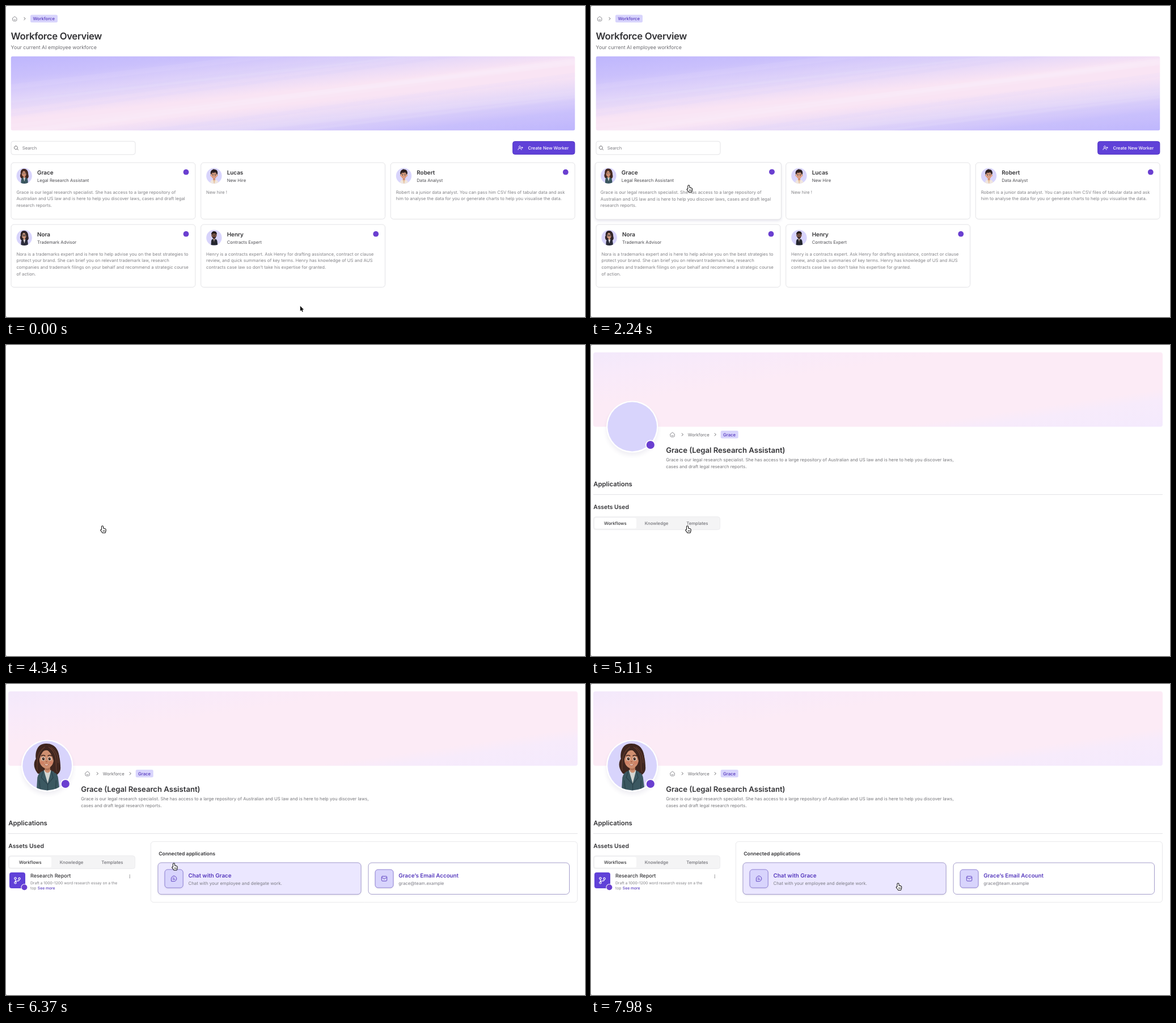
Recreate the animation shown at these times as an HTML page with a canvas. Size 1021 px wide and 548 px high, loop 8 s.

```html
<!DOCTYPE html>
<html lang="en">
<head>
<meta charset="utf-8">
<title>Workforce</title>
<style>
  html, body { margin: 0; width: 100%; height: 100%; overflow: hidden; background: #fff; }
  canvas { display: block; width: 100vw; height: 100vh; }
</style>
</head>
<body>
<canvas id="stage"></canvas>
<script>
const W = 1021, H = 548, LOOP = 8000, STEP = 70;
const canvas = document.getElementById('stage');
const ctx = canvas.getContext('2d');
const ratio = window.devicePixelRatio || 1;
canvas.width = W * ratio;
canvas.height = H * ratio;

const INK = '#333336', DARK = '#4d4d52', GREY = '#838387', LINE = '#e3e3e6';
const PURPLE = '#6041d8', DEEP = '#5538bd', LILAC = '#d8d4fc', BADGE = '#6a3fd0';

const ICONS = {
  home: 'M4 10 L12 3.5 L20 10 V17 a4 4 0 0 1 -4 4 H8 a4 4 0 0 1 -4 -4 Z M8.5 15.5 q3.5 3 7 0',
  next: 'M9 5 L16 12 L9 19',
  search: 'M11 3 a8 8 0 1 0 .01 0 M17 17 L22 22',
  addUser: 'M9 4 a4 4 0 1 0 .01 0 M2 20 v-1 a5 5 0 0 1 5 -5 h4 a5 5 0 0 1 5 5 v1 M19 8 v6 M16 11 h6',
  chat: 'M12 3 a9 9 0 1 1 0 18 H4 a1 1 0 0 1 -1 -1 V12 a9 9 0 0 1 9 -9 M8 10 h5 M8 14.5 h8',
  mail: 'M6 4 h12 a3 3 0 0 1 3 3 v10 a3 3 0 0 1 -3 3 H6 a3 3 0 0 1 -3 -3 V7 a3 3 0 0 1 3 -3 M4 8 L12 13 L20 8',
  branch: 'M6 3 a3 3 0 1 0 .01 0 M6 9 v7 M6 16 a3 3 0 1 0 .01 0 M18 4 a3 3 0 1 0 .01 0 M18 10 q0 4 -5 4 h-3 q-4 0 -4 3'
};
for (const k in ICONS) ICONS[k] = new Path2D(ICONS[k]);
const HAND = new Path2D('M-1.1 .8 A1.1 1.1 0 0 1 1.1 .8 L1.1 4 Q2 3.4 2.8 4.2 Q3.8 3.8 4.4 4.7 Q5.6 4.6 5.8 5.7 L5.7 8 Q5.5 9.4 4.7 11 L.3 11 Q-1.2 8.8 -2.7 7 Q-3 5.8 -1.9 5.8 L-1.1 6.5 Z');
const KNUCKLES = new Path2D('M1.2 6.8 V9.2 M2.7 6.8 V9.2 M4.2 6.8 V9.2');
const ARROW = new Path2D('M0 0 V9 L2.1 7.2 L3.5 10.3 L5 9.6 L3.6 6.6 L6.3 6.4 Z');

const clamp = v => Math.max(0, Math.min(1, v));
const smooth = v => v * v * (3 - 2 * v);

// y is the middle of the capitals
function text(str, x, y, size, color, weight = 400, spacing = 0) {
  ctx.font = `${weight} ${size}px Inter, sans-serif`;
  ctx.letterSpacing = spacing + 'px';
  ctx.fillStyle = color;
  ctx.fillText(str, x, y + size * 0.36);
}
function lines(list, x, y, size, color) {
  list.forEach((s, i) => text(s, x, y + i * 11.6, size, color));
}
function box(x, y, w, h, r, fill, stroke, lw = 1) {
  ctx.beginPath();
  ctx.roundRect(x, y, w, h, r);
  if (fill) { ctx.fillStyle = fill; ctx.fill(); }
  if (stroke) { ctx.strokeStyle = stroke; ctx.lineWidth = lw; ctx.stroke(); }
}
function oval(x, y, rx, ry, fill) {
  ctx.beginPath();
  ctx.ellipse(x, y, rx, ry, 0, 0, 7);
  ctx.fillStyle = fill;
  ctx.fill();
}
const disc = (x, y, r, fill) => oval(x, y, r, r, fill);
function shape(d, fill) {
  ctx.fillStyle = fill;
  ctx.fill(new Path2D(d));
}
function stroke(d, color, lw) {
  ctx.strokeStyle = color;
  ctx.lineWidth = lw;
  ctx.stroke(new Path2D(d));
}
function icon(name, x, y, size, color, lw = 0.8) {
  const k = size / 24;
  ctx.save();
  ctx.translate(x - size / 2, y - size / 2);
  ctx.scale(k, k);
  ctx.strokeStyle = color;
  ctx.lineWidth = lw / k;
  ctx.lineCap = ctx.lineJoin = 'round';
  ctx.stroke(ICONS[name]);
  ctx.restore();
}
function shadow(alpha, blur, dy) {
  ctx.shadowColor = `rgba(60,50,110,${alpha})`;
  ctx.shadowBlur = blur * ratio;
  ctx.shadowOffsetY = dy * ratio;
}
// runs draw scaled about the middle of a rectangle
function grow(x, y, w, h, amount, draw) {
  const cx = x + w / 2, cy = y + h / 2;
  ctx.save();
  ctx.translate(cx, cy);
  ctx.scale(1 + amount, 1 + amount);
  ctx.translate(-cx, -cy);
  draw();
  ctx.restore();
}

function banner(x, y, w, h, slope, span, stops, streaks) {
  const len = span / (1 + slope * slope);
  const g = ctx.createLinearGradient(x, y, x + slope * len, y + len);
  stops.forEach(([p, c]) => g.addColorStop(p, c));
  ctx.save();
  ctx.beginPath();
  ctx.roundRect(x, y, w, h, 4);
  ctx.clip();
  ctx.fillStyle = g;
  ctx.fillRect(x, y, w, h);
  let seed = 7;
  const rnd = () => (seed = seed * 16807 % 2147483647) / 2147483647;
  for (let i = 0; i < streaks; i++) {
    const top = y + rnd() * span, thick = 3 + rnd() * 9, tilt = w * (slope + 0.03 * rnd());
    ctx.fillStyle = i % 2 ? 'rgba(255,240,252,.06)' : 'rgba(190,178,252,.06)';
    ctx.beginPath();
    ctx.moveTo(x, top);
    ctx.lineTo(x + w, top - tilt);
    ctx.lineTo(x + w, top - tilt + thick);
    ctx.lineTo(x, top + thick);
    ctx.fill();
  }
  ctx.restore();
}

function face({ hair, skin, glasses, beard }) {
  oval(0, -13, 14.5, 18.5, skin);
  if (beard) shape('M-14 -9 Q-13 8 0 8 Q13 8 14 -9 Q9 -3 0 -4 Q-9 -3 -14 -9 Z', hair);
  oval(-9, -6, 4, 3, 'rgba(205,90,70,.25)');
  oval(9, -6, 4, 3, 'rgba(205,90,70,.25)');
  for (const s of [-1, 1]) {
    oval(s * 6.5, -14, 3.8, 3.8, '#f6efea');
    oval(s * 6.3, -14, 2.7, 3.1, '#40261b');
    disc(s * 6.3 + 0.8, -15.2, 0.7, '#fff');
  }
  stroke('M-10.5 -20 Q-6.5 -22.5 -3 -20 M3 -20 Q6.5 -22.5 10.5 -20', hair, 1.7);
  if (glasses) stroke('M-11.5 -18.5 h9 v9 h-9 Z M2.5 -18.5 h9 v9 h-9 Z M-2.5 -14 h5', hair, 1.6);
  oval(0, -8, 2, 1.5, 'rgba(150,70,50,.5)');
  shape('M-5 -3 Q0 -1.6 5 -3 Q0 2.5 -5 -3 Z', '#fff0ea');
  stroke('M-5 -3 Q0 3 5 -3', '#a04b3b', 1);
}

function avatar(x, y, r, look) {
  const { hair, skin, coat, shirt, long, glasses, zoom = 1, drop = 0 } = look;
  ctx.save();
  disc(x, y, r, LILAC);
  ctx.beginPath();
  ctx.arc(x, y, r, 0, 7);
  ctx.clip();
  ctx.translate(x, y + drop * r / 50);
  ctx.scale(r / 50 * zoom, r / 50 * zoom);
  ctx.lineCap = 'round';
  if (long) shape('M-3 -45 C-20 -45 -25 -28 -23 -14 C-30 -4 -26 8 -19 16 L18 20 C30 12 28 2 24 -8 C27 -30 16 -46 -3 -45 Z', hair);
  else oval(0, -26, 19, 17, hair);
  shape('M-22 56 L-20 24 Q-18 14 -8 10 L8 10 Q20 13 22 24 L26 56 Z', coat);
  shape('M-7 9 L1 36 L8 9 Z', shirt);
  shape('M-5 -2 H6 V11 Q1 18 -5 11 Z', skin);
  shape('M-5 2 Q0 8 6 2 V7 Q0 12 -5 7 Z', 'rgba(110,50,30,.3)');
  if (!long) { oval(-16, -12, 4, 5, skin); oval(16, -12, 4, 5, skin); }
  ctx.save();
  if (long) ctx.translate(-1.5, 0);
  face(look);
  ctx.restore();
  if (long) {
    shape('M-1 -43 C-18 -43 -24 -22 -21 -6 C-26 2 -23 10 -17 14 Q-14 6 -17 -6 Q-16 -22 -4 -34 Q9 -28 13 -10 Q18 0 14 14 Q24 18 27 4 C27 -24 18 -45 -1 -43 Z', hair);
    stroke('M-5 -38 Q-19 -28 -20 -10 T-20 9 M3 -38 Q18 -28 18 -8 T20 12 M8 -37 Q23 -26 22 -6', 'rgba(165,100,70,.4)', 1.3);
    stroke('M-8 10 L-12 24 L1 38 L12 24 L8 10 M1 38 V50 M-16 30 L-14 50 M18 30 L17 50', 'rgba(10,20,30,.4)', 1.2);
  } else {
    shape('M-17 -16 Q-20 -38 -8 -42 Q-2 -47 4 -43 Q14 -44 17 -34 Q20 -26 16 -15 Q14 -27 7 -28 Q-6 -24 -12 -28 Q-16 -24 -17 -16 Z', hair);
    if (glasses) shape('M-1 14 H3 L4 34 L1 38 L-2 34 Z', '#3b2a2c');
  }
  ctx.restore();
}

const LOOKS = {
  grace: { hair: '#3f261f', skin: '#cf8f70', coat: '#3b5861', shirt: '#d3d6d3', long: true },
  boy: { hair: '#2c2022', skin: '#dfa184', coat: '#f0e6df', shirt: '#e8c9a8', zoom: 1.22, drop: 12 },
  nora: { hair: '#2a2127', skin: '#cf9a80', coat: '#2c2d3c', shirt: '#e6e2e4', long: true, glasses: true },
  henry: { hair: '#221a1b', skin: '#8d5b45', coat: '#23262f', shirt: '#e6e3e1', glasses: true, beard: true, zoom: 0.9, drop: -2 }
};

const NEVER = 9000;
const CARDS = [
  { x: 9, y: 276, h: 99.5, name: 'Grace', role: 'Legal Research Assistant', look: LOOKS.grace, badge: true, on: 1400,
    info: ['Grace is our legal research specialist. She has access to a large repository of', 'Australian and US law and is here to help you discover laws, cases and draft legal', 'research reports.'] },
  { x: 343.7, y: 276, h: 99.5, name: 'Lucas', role: 'New Hire', look: LOOKS.boy, info: ['New hire !'] },
  { x: 678.3, y: 276, h: 99.5, name: 'Robert', role: 'Data Analyst', look: LOOKS.boy, badge: true,
    info: ['Robert is a junior data analyst. You can pass him CSV files of tabular data and ask', 'him to analyse the data for you or generate charts to help you visualise the data.'] },
  { x: 9, y: 385, h: 110.5, name: 'Nora', role: 'Trademark Advisor', look: LOOKS.nora, badge: true,
    info: ['Nora is a trademarks expert and is here to help advise you on the best strategies to', 'protect your brand. She can brief you on relevant trademark law, research', 'companies and trademark filings on your behalf and recommend a strategic course', 'of action.'] },
  { x: 343.7, y: 385, h: 110.5, name: 'Henry', role: 'Contracts Expert', look: LOOKS.henry, badge: true, on: 1190, off: 1400,
    info: ['Henry is a contracts expert. Ask Henry for drafting assistance, contract or clause', 'review, and quick summaries of key terms. Henry has knowledge of US and AUS', 'contracts case law so don’t take his expertise for granted.'] }
];

const hover = (t, on = NEVER, off = NEVER) => smooth(clamp((t - on) / 150)) * (1 - smooth(clamp((t - off) / 150)));

function card(c, t) {
  const { x, y, h } = c, w = 324.8, p = hover(t, c.on, c.off);
  grow(x, y, w, h, 0.01 * p, () => {
    ctx.save();
    if (p) shadow(0.14 * p, 5, 2.5);
    box(x, y, w, h, 5, '#fff');
    ctx.restore();
    box(x, y, w, h, 5, null, LINE);
    avatar(x + 23.2, y + 23.3, 13.7, c.look);
    text(c.name, x + 46, y + 17.5, 9.9, INK, 600);
    text(c.role, x + 46, y + 31.3, 7.7, DARK);
    if (c.badge) disc(x + 308.5, y + 16.7, 4.9, BADGE);
    lines(c.info, x + 9.4, y + 52, 7.72, GREY);
  });
}

function listPage(t) {
  icon('home', 15.3, 22.3, 11, '#6f6f75', 0.8);
  icon('next', 32.8, 22.3, 7.5, '#56565b', 0.9);
  box(43, 15.5, 48, 13.5, 2.5, LILAC);
  text('Workforce', 47.5, 22.3, 7.7, DEEP, 500);
  text('Workforce Overview', 8.6, 53, 16.8, INK, 600, -0.35);
  text('Your current AI employee workforce', 8.6, 72.8, 8.87, '#6c6c71');
  banner(8.5, 88.5, 995, 131, 0.105, 235,
    [[0, '#beb6fd'], [0.16, '#cac0fc'], [0.34, '#e3d6f9'], [0.48, '#f9e4f4'], [0.58, '#f9e4f4'], [0.7, '#e6d9f8'], [0.86, '#cac0fc'], [1, '#beb6fd']], 16);
  box(9, 238.3, 219, 23.5, 4, '#fff', LINE);
  icon('search', 17.8, 250, 9, '#5f5f64', 0.9);
  text('Search', 28.8, 250, 7.7, '#7c7c81');
  box(893.7, 238.7, 109.2, 22.6, 3.5, PURPLE, '#4e30c4');
  icon('addUser', 907.2, 250, 10, '#fff', 0.9);
  text('Create New Worker', 920.4, 250, 7.7, '#fff', 500);
  CARDS.forEach(c => card(c, t));
}

function appCard(x, w, p, glyph, title, sub) {
  const y = 315;
  grow(x, y, w, 55.5, 0.006 * p, () => {
    ctx.save();
    if (p) shadow(0.12 * p, 3, 1.5);
    box(x, y, w, 55.5, 6, '#fff');
    ctx.restore();
    box(x, y, w, 55.5, 6, `rgba(235,231,255,${p})`, '#9a92c6', 0.9);
    ctx.save();
    shadow(0.12, 3, 1.5);
    box(x + 12, y + 12, 32, 32, 5, LILAC);
    ctx.restore();
    box(x + 12, y + 12, 32, 32, 5, null, '#8778cf', 0.9);
    icon(glyph, x + 28, y + 28, 12.5, DEEP, 0.9);
    text(title, x + 53.2, y + 22, 9.8, DEEP, 600);
    text(sub, x + 53.2, y + 36, 7.8, '#7d7d86');
  });
}

function workflow() {
  box(6, 332, 28, 28, 4, PURPLE);
  icon('branch', 20, 346, 14, '#fff', 1.1);
  disc(32.4, 358.2, 6, '#fff');
  disc(32.4, 358.2, 5, BADGE);
  text('Research Report', 43, 338, 9, INK, 500);
  text('Draft a 1000-1200 word research essay on a the', 43, 350.6, 6.75, GREY);
  text('top', 43, 359.6, 6.75, GREY);
  text('See more', 55.8, 359.6, 6.75, DEEP, 500);
  [-2.4, 0, 2.4].forEach(d => disc(218.2, 339 + d, 0.7, '#55555a'));
}

function detailPage(t) {
  banner(4, 13, 1004, 131, 0.145, 276,
    [[0, '#f3e9fb'], [0.14, '#f8eafa'], [0.34, '#fcebf6'], [0.76, '#fcebf6'], [0.83, '#f7ebfb'], [1, '#f4eafd']], 0);
  ctx.save();
  shadow(0.08, 7, 5);
  disc(72.7, 144, 45.6, '#fff');
  ctx.restore();
  if (t >= 5180) avatar(72.7, 144, 43.4, LOOKS.grace);
  else disc(72.7, 144, 43.4, LILAC);
  disc(104.8, 176, 8.8, '#fff');
  disc(104.8, 176, 7.1, BADGE);

  icon('home', 143.6, 157.8, 11, '#6f6f75', 0.8);
  icon('next', 161.2, 157.8, 7.5, '#56565b', 0.9);
  text('Workforce', 170.8, 157.8, 7.7, '#6c6c71');
  icon('next', 219, 157.8, 7.5, '#56565b', 0.9);
  box(228.7, 151, 31, 13.5, 2.5, LILAC);
  text('Grace', 233, 157.8, 7.7, DEEP, 500);
  text('Grace (Legal Research Assistant)', 132.2, 185.2, 13.1, INK, 600);
  lines(['Grace is our legal research specialist. She has access to a large repository of Australian and US law and is here to help you discover laws,',
    'cases and draft legal research reports.'], 132.2, 202.2, 7.8, '#77777b');
  text('Applications', 4.2, 245.3, 11.35, INK, 600);
  ctx.fillStyle = LINE;
  ctx.fillRect(4, 263, 1004, 1);
  text('Assets Used', 4.2, 285.3, 10.35, INK, 600);
  box(4.5, 302.7, 223, 22.8, 4, '#f4f4f5', '#ececee');
  box(6.3, 304.8, 73.7, 18.4, 3, '#fff');
  text('Workflows', 23, 314, 7.75, INK, 500);
  text('Knowledge', 94.7, 314, 7.75, '#737378', 500);
  text('Templates', 168.2, 314, 7.75, '#737378', 500);

  if (t >= 5320) workflow();
  if (t >= 5250) {
    box(255.3, 277.7, 752.2, 107, 5, '#fff', '#e8e8ea');
    text('Connected applications', 269.2, 298.6, 8.72, INK, 600);
    const chat = hover(t, 6160, 6930) + hover(t, 7660);
    appCard(269, 356, chat, 'chat', 'Chat with Grace', 'Chat with your employee and delegate work.');
    appCard(639, 354.5, hover(t, 6960, 7660), 'mail', 'Grace’s Email Account', 'grace@team.example');
  }
}

// time, x, y of the pointer tip
const PATH = [
  [0, 518.8, 528.6], [1120, 518.8, 528.6], [1470, 243.5, 281], [1960, 179, 308], [2380, 170, 319.6],
  [5810, 170, 319.6], [6370, 296, 316.6], [6650, 440, 342], [6790, 440, 342],
  [7210, 714.3, 358.6], [7420, 752, 357], [7980, 541.5, 351.7]
];
function pointerAt(t) {
  const i = PATH.findIndex(k => k[0] > t);
  if (i < 0) return PATH[PATH.length - 1].slice(1);
  const a = PATH[i - 1], b = PATH[i], p = smooth((t - a[0]) / (b[0] - a[0]));
  return [a[1] + (b[1] - a[1]) * p, a[2] + (b[2] - a[2]) * p];
}
function pointer(t) {
  const [x, y] = pointerAt(t);
  const hand = t < 5040 ? y < 495 : x < 228 || (x > 268 && x < 626) || x > 638;
  ctx.save();
  ctx.translate(x, y);
  ctx.lineJoin = 'round';
  ctx.strokeStyle = hand ? '#000' : '#fff';
  ctx.fillStyle = hand ? '#fff' : '#111';
  ctx.lineWidth = hand ? 1.9 : 1.2;
  ctx.stroke(hand ? HAND : ARROW);
  ctx.fill(hand ? HAND : ARROW);
  if (hand) {
    ctx.lineWidth = 0.7;
    ctx.stroke(KNUCKLES);
  }
  ctx.restore();
}

function draw(now) {
  const t = Math.floor(now % LOOP / STEP) * STEP;
  ctx.setTransform(canvas.width / W, 0, 0, canvas.height / H, 0, 0);
  ctx.textRendering = 'geometricPrecision';
  ctx.fillStyle = '#fff';
  ctx.fillRect(0, 0, W, H);
  if (t < 4340) listPage(t);
  else if (t >= 5040) detailPage(t);
  ctx.fillStyle = '#999';
  ctx.fillRect(0, 0, 1, 1);
  ctx.fillRect(0, H - 1, 1, 1);
  pointer(t);
}

const start = performance.now();
function frame() {
  draw(performance.now() - start);
  requestAnimationFrame(frame);
}
frame();
</script>
</body>
</html>
```
